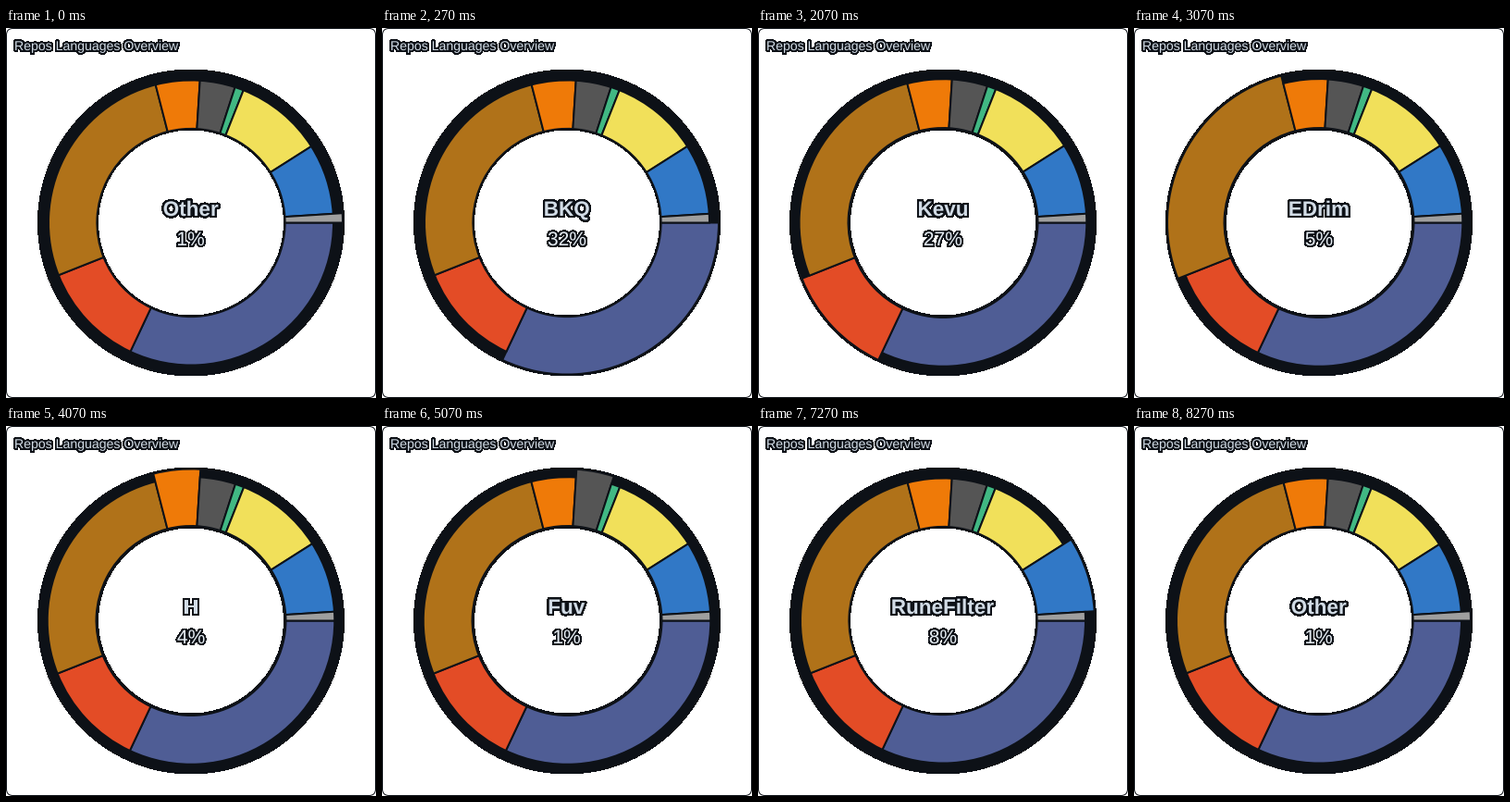
Recreate the animation shown at these times as a matplotlib script. Size 400 px wide and 400 px high, loop 8.99 s.

```python
import matplotlib.pyplot as plt
from matplotlib.animation import FuncAnimation
from matplotlib.patches import FancyBboxPatch, PathPatch, Wedge
from matplotlib.path import Path
from matplotlib.textpath import TextPath
from matplotlib.transforms import Affine2D

SIZE, DPI = 400, 100
LOOP_MS, TICK_MS = 8990, 10
FIRST_CHANGE, SLOT_MS = 70, 1000
STEP_TIMES = (60, 130, 200)          # later steps of each transition
CENTER = (200, 210.5)
R_MAX, POP, CUTOUT = 164, 10, 0.66
DARK, LIGHT = "#0d1117", "#d2dce6"
FONT = "Liberation Sans"

# name, percentage, color; clockwise from the right
SLICES = [
    ("BKQ", 32, "#4f5d95"),
    ("WQDL", 12, "#e34c26"),
    ("Kevu", 27, "#b07219"),
    ("EDrim", 5, "#ef7a08"),
    ("H", 4, "#555555"),
    ("Fuv", 1, "#41b883"),
    ("KevuFilter", 10, "#f1e05a"),
    ("RuneFilter", 8, "#3178c6"),
    ("Other", 1, "#9f9f9f"),
]


def px(width):
    return width * 72 / DPI


def text_path(text, size, x, y, weight="normal", centered=True):
    path = TextPath((0, 0), text, size=size,
                    prop={"family": FONT, "weight": weight})
    if centered:
        box = path.get_extents()
        x -= (box.x0 + box.x1) / 2
    return Affine2D().scale(1, -1).translate(x, y).transform_path(path)


def outlined(path, stroke, fill=LIGHT):
    """Add a hard-edged dark outline with a light fill over it."""
    back = PathPatch(path, fc=DARK, ec=DARK, lw=px(stroke),
                     joinstyle="round", antialiased=False)
    front = PathPatch(path, fc=fill, lw=0)
    return [ax.add_patch(back), ax.add_patch(front)]


fig = plt.figure(figsize=(SIZE / DPI, SIZE / DPI), dpi=DPI, facecolor="white")
ax = fig.add_axes([0, 0, 1, 1])
ax.set_xlim(0, SIZE)
ax.set_ylim(SIZE, 0)
ax.axis("off")

ax.add_patch(FancyBboxPatch((0.5, 0.5), SIZE - 1, SIZE - 1, fc="white", ec=DARK,
                            lw=px(1), boxstyle="round,pad=0,rounding_size=7"))
ax.add_patch(Wedge(CENTER, 165.5, 0, 360, width=65, fc=DARK, lw=0,
                   antialiased=False))

wedges = []
start = 0
for _, share, color in SLICES:
    end = start + share * 3.6
    wedge = Wedge(CENTER, R_MAX - POP, start, end, width=52, fc=color, ec=DARK,
                  lw=px(2), joinstyle="miter")
    wedges.append(ax.add_patch(wedge))
    start = end

outlined(text_path("Repos Languages Overview", 14.1, 9, 24, centered=False), 3)
name_paths = [text_path(s[0], 22.5, 200, 203, "bold") for s in SLICES]
share_paths = [text_path(f"{s[1]}%", 21, 200, 235) for s in SLICES]
name_text = outlined(Path([(0, 0)]), 3.8)
share_text = outlined(Path([(0, 0)]), 3, "#e6edf3")


def ease(t):
    return 2 * t * t if t < 0.5 else 1 - 2 * (1 - t) ** 2


def update(frame):
    elapsed = (frame * TICK_MS - FIRST_CHANGE) % LOOP_MS
    active = min(elapsed // SLOT_MS, len(SLICES) - 1)
    local = elapsed - active * SLOT_MS
    step = 1 + sum(local >= t for t in STEP_TIMES)
    progress = ease(step / 4)

    # The new slice rises a little behind the old one's fall.
    offsets = [0] * len(SLICES)
    offsets[active - 1] = POP * (1 - progress)
    offsets[active] = POP * progress ** 2
    # The ring fills whatever room the most raised slice leaves.
    radius = R_MAX - max(offsets)
    inner = radius * CUTOUT
    for wedge, offset in zip(wedges, offsets):
        wedge.set_radius(radius + offset)
        wedge.set_width(radius + offset - inner)

    for patches, paths in ((name_text, name_paths), (share_text, share_paths)):
        for patch in patches:
            patch.set_path(paths[active])
    return wedges + name_text + share_text


anim = FuncAnimation(fig, update, frames=LOOP_MS // TICK_MS, interval=TICK_MS,
                     repeat=True, repeat_delay=0, blit=False)
plt.show()
```
